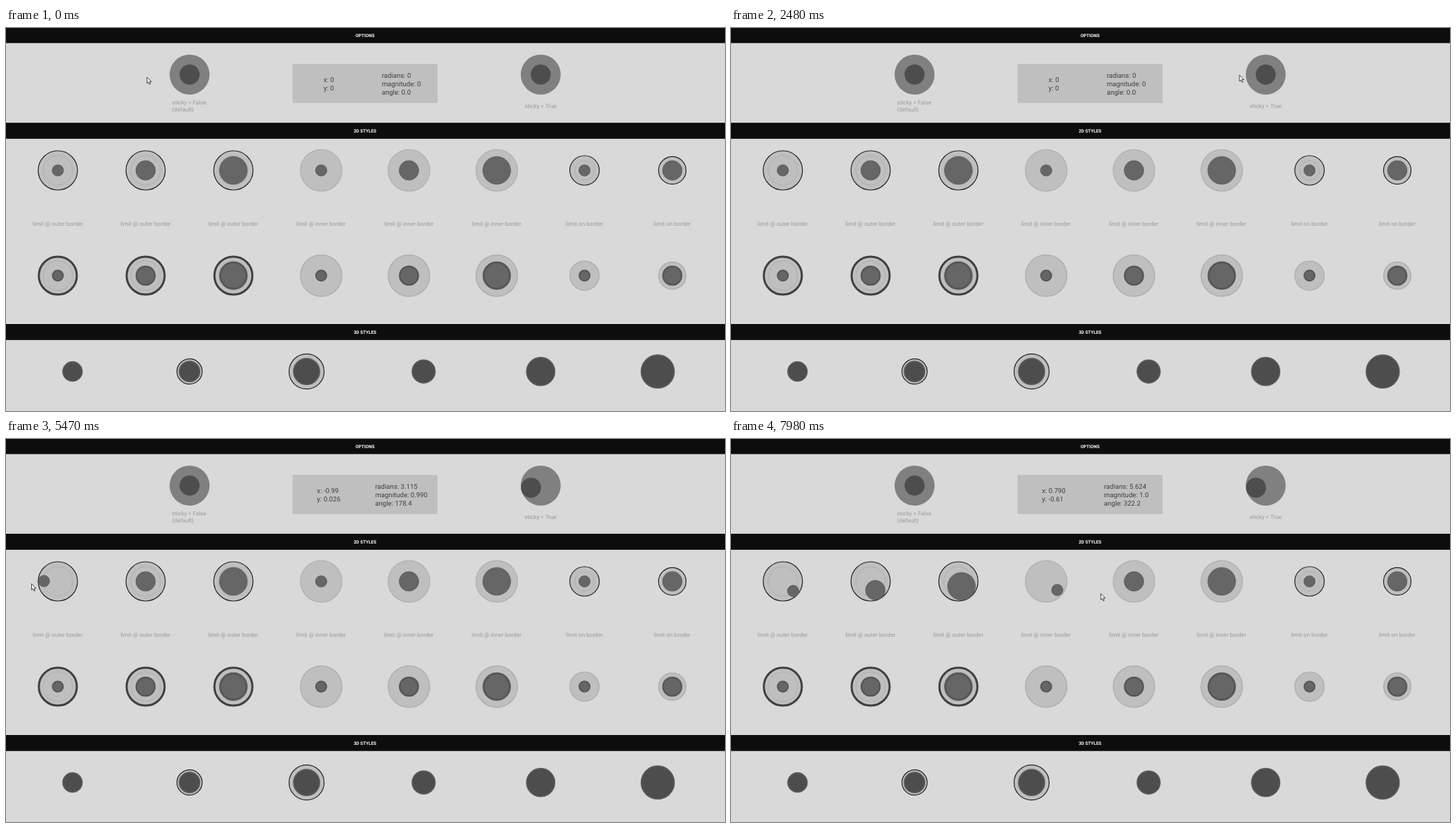
An HTML page for the animation above (8000 ms loop, 1025 by 546 pixels).

```html
<!DOCTYPE html>
<html lang="en">
<head>
<meta charset="utf-8">
<title>Joystick styles</title>
<style>
  html, body { margin: 0; width: 100%; height: 100%; overflow: hidden; background: #d9d9d9; }
  svg { display: block; width: 100%; height: 100%; }
  text { font-family: Roboto, "Open Sans", sans-serif; text-rendering: geometricPrecision; white-space: pre; }
  .bar { fill: #0d0d0d; }
  .title { font-size: 6.4px; font-weight: 700; fill: #fff; text-anchor: middle; }
  .caption { font-size: 8.15px; fill: #999; }
  .mid { text-anchor: middle; }
  .value { font-size: 9.65px; fill: #404040; }
</style>
</head>
<body>
<svg id="stage" viewBox="0 0 1025 546"></svg>
<script>
const LOOP = 8000, TOUCH_LAG = 40;
const DARK = '#222', SOFT = '#b0b0b0', BASE = '#bfbfbf';
const stage = document.getElementById('stage');

function add(tag, attrs, text) {
  const el = document.createElementNS('http://www.w3.org/2000/svg', tag);
  for (const k in attrs) el.setAttribute(k, attrs[k]);
  if (text) el.textContent = text;
  stage.append(el);
  return el;
}

// r is the outer radius, including the line
function disc(x, y, r, fill, line = 'none', w = 0) {
  return add('circle', { cx: x, cy: y, r: r - w / 2, fill, stroke: line, 'stroke-width': w });
}

function label(x, y, cls, text) {
  return add('text', { x, y, class: cls }, text);
}

function bar(y, title) {
  add('rect', { x: 0, y, width: 1025, height: 22.8, class: 'bar' });
  label(511.8, y + 14.2, 'title', title);
}

bar(-1.3, 'OPTIONS');
bar(135.1, '2D STYLES');
bar(422, '3D STYLES');
add('rect', { x: 408.6, y: 51.2, width: 206.6, height: 55.8, fill: BASE });

// Movable sticks: centre, travel limit, pad
const sticks = [];
function stick(x, y, limit, pad, sticky = true) {
  sticks.push({ x, y, limit, pad, sticky });
}

for (const sticky of [false, true]) {
  const x = sticky ? 762.3 : 261.7, y = 66.4;
  disc(x, y, 28.5, '#808080');
  stick(x, y, 14.2, disc(x, y, 14.3, '#4d4d4d'), sticky);
}
label(236.8, 109.2, 'caption', 'sticky = False');
label(236.8, 119.1, 'caption', '(default)');
label(762, 114.4, 'caption mid', 'sticky = True');

const kinds = [
  { where: '@ outer', radius: 28.6 },
  { where: '@ inner', radius: 30.3 },
  { where: 'on', radius: 21.6 }
];
for (let i = 0; i < 8; i++) {
  const kind = Math.floor(i / 3), size = i % 3;
  const { where, radius } = kinds[kind];
  const x = 73.9 + 125.14 * i, pad = 8.5 + 5.85 * size;
  const outer = kind === 2 ? radius - 1.4 * size : radius;

  disc(x, 203, outer, BASE, kind === 1 ? SOFT : DARK, 1.2);
  if (kind !== 1) disc(x, 203, outer - 7.2, 'none', '#aeaeae', 0.9);
  stick(x, 203, 28.5 - pad, disc(x, 203, pad, '#666', '#595959', 0.8));

  disc(x, 353, outer, BASE, kind ? SOFT : '#404040', kind ? 1.5 : 3);
  if (!kind) disc(x, 353, outer - 7.2, 'none', '#aeaeae', 0.9);
  disc(x, 353, pad, '#666', '#575757', 2 + size / 2);

  label(x - 0.2, 282, 'caption mid', `limit ${where} border`);
}

[14.6, 15.4, 19.4, 17.2, 20.9, 24.4].forEach((pad, i) => {
  const x = 94.8 + 166.86 * i, y = 489.7;
  if (i < 3) disc(x, y, 11.6 + 7 * i, BASE, DARK, 1.2);
  disc(x, y, pad, '#4d4d4d', '#5c5c5c', 1.6);
});

// Lines share a left edge; the block is centred on cx
function block(cx, top, count) {
  return { cx, rows: Array.from({ length: count }, (_, i) => label(cx, top + 12 * i, 'value')) };
}
const xy = block(460.1, 76.5, 2);
const polar = block(563.6, 70.5, 3);
const cursor = add('path', {
  d: 'M0 0V8.8L2 7 3.4 10.3 4.9 9.7 3.6 6.4H6.3Z',
  fill: '#fff', stroke: '#1a1a1a', 'stroke-width': 0.8, 'stroke-linejoin': 'round'
});

// Pointer path (time, x, y) and the drags made along it
const path = [], drags = [];

function go(time, [x, y], rest = 0) {
  path.push([time, x, y]);
  if (rest) path.push([time + rest, x, y]);
}

// Point at a distance and angle from a stick's centre
function aim(i, dist, deg) {
  const a = deg * Math.PI / 180;
  return [sticks[i].x + dist * Math.cos(a), sticks[i].y - dist * Math.sin(a)];
}

// Grab the centre, then pull in each direction in turn, resting after each pull
function drag(i, from, to, reach, angles, rest = 0) {
  const leg = (to - from) / angles.length;
  go(from, aim(i, 0, 0), 60);
  angles.forEach((deg, n) => go(from + leg * (n + 1 - rest), aim(i, reach, deg), leg * rest));
  drags.push({ s: sticks[i], from, to });
}

go(0, [201, 69.4], 150);
drag(0, 560, 1860, 31, [5.928, 183], 0.4);
drag(1, 2600, 3930, 19.5, [0, 192.53], 0.4);
go(4540, [199, 159.8]);
drag(2, 4960, 5430, 19.81, [178.485]);
go(5470, [36.5, 205.8]);
go(5730, [70, 228]);
go(5850, aim(2, 32, -43));
drags[2].to = 5850;
drag(3, 6140, 6440, 28.5, [298.2]);
go(6490, [231.8, 228.5]);
drag(4, 6800, 7050, 24, [302]);
drag(5, 7470, 7780, 30, [322.25]);
go(7980, [527.2, 219.8], 20);

function slope(i, axis) {
  return (path[i + 1][axis] - path[i][axis]) / (path[i + 1][0] - path[i][0]);
}

function tangent(i, axis) {
  if (i === 0 || i === path.length - 1) return 0;
  const a = slope(i - 1, axis), b = slope(i, axis);
  return a * b > 0 ? 2 * a * b / (a + b) : 0;
}

// Monotone cubic through the path
function pointer(t) {
  t = Math.max(0, t);
  let i = 0;
  while (i < path.length - 2 && path[i + 1][0] <= t) i++;
  const h = path[i + 1][0] - path[i][0], u = (t - path[i][0]) / h;
  const ease = u * u * (3 - 2 * u);
  return [1, 2].map(k => path[i][k] * (1 - ease) + path[i + 1][k] * ease
    + h * u * (1 - u) * ((1 - u) * tangent(i, k) - u * tangent(i + 1, k)));
}

function pose(s, t) {
  const [px, py] = pointer(t);
  const x = (px - s.x) / s.limit, y = (s.y - py) / s.limit;
  const d = Math.hypot(x, y), k = d > 1 ? 1 / d : 1;
  return { x: x * k, y: y * k, mag: Math.min(d, 1) };
}

const short = v => Number.isInteger(v) ? v.toFixed(1) : v.toFixed(6).slice(0, 5);

function show(b, lines) {
  b.rows.forEach((row, i) => { row.textContent = lines[i]; });
  const width = Math.max(...b.rows.map(row => row.getComputedTextLength()));
  for (const row of b.rows) row.setAttribute('x', b.cx - width / 2);
}

function draw(t) {
  const [px, py] = pointer(t), touch = t - TOUCH_LAG;
  const idle = ['0', '0', '0', '0', '0.0'];
  let read = idle;
  cursor.setAttribute('transform', `translate(${px} ${py + 0.6})`);
  for (const s of sticks) s.pad.removeAttribute('transform');
  for (const { s, from, to } of drags) {
    if (touch < from) break;
    if (touch > to && !s.sticky) {
      read = idle;
      continue;
    }
    const p = pose(s, Math.min(touch, to));
    const rad = (Math.atan2(p.y, p.x) + 2 * Math.PI) % (2 * Math.PI);
    s.pad.setAttribute('transform', `translate(${p.x * s.limit} ${-p.y * s.limit})`);
    read = [p.x, p.y, rad, p.mag, rad * 180 / Math.PI].map(short);
  }
  show(xy, [`x: ${read[0]}`, `y: ${read[1]}`]);
  show(polar, [`radians: ${read[2]}`, `magnitude: ${read[3]}`, `angle: ${read[4]}`]);
}

function tick() {
  draw(Math.round(performance.now() % LOOP / 10) * 10);
  requestAnimationFrame(tick);
}
tick();
</script>
</body>
</html>
```
